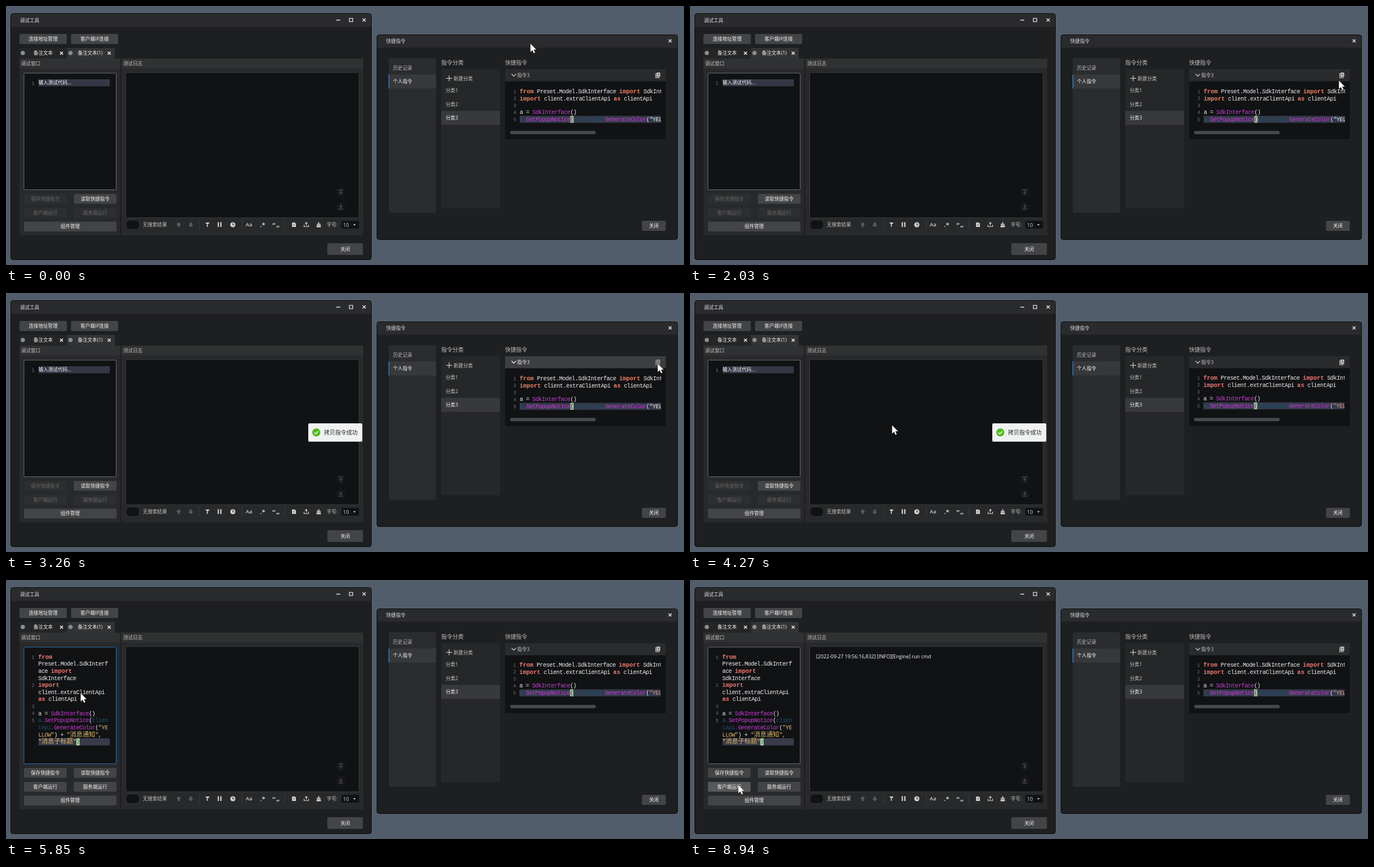
These frames come from a looping animation (1209x463 px, 10000 ms). An HTML page:

```html
<!DOCTYPE html>
<html lang="zh-CN">
<head>
<meta charset="utf-8">
<title>调试工具</title>
<style>
html, body { margin: 0; width: 100%; height: 100%; overflow: hidden; background: #515d6a; }
svg { display: block; width: 100%; height: 100%; }
text { font-family: "Open Sans", "Noto Sans CJK SC", "Noto Sans CJK", sans-serif; white-space: pre; }
.code { font-family: "Liberation Mono", "Noto Sans CJK SC", monospace; font-size: 10.3px; letter-spacing: -.54px; fill: #f0f0f0; }
.num { font-size: 8.6px; letter-spacing: 0; fill: #687089; text-anchor: end; }
.k { fill: #ee8560; font-weight: bold; letter-spacing: .11px; }
.f { fill: #cb3bd8; }
.v { fill: #245068; }
.s { fill: #dcb866; }
.c { fill: #dcb866; font-size: 11.28px; letter-spacing: 0; }
.q { fill: #f0f0f0; }
.b { fill: #26402c; }
.late .k, #pasted .k { fill: #f07a74; }
.late .q { fill: #e39a72; }
.late .num { fill: #6c6c6c; }
.late .v, #pasted .v { fill: #17546c; }
</style>
</head>
<body>
<svg id="stage" viewBox="0 0 1209 463"></svg>
<script>
const rect = (x, y, w, h, fill, more = '') =>
  `<rect x="${x}" y="${y}" width="${w}" height="${h}" fill="${fill}" ${more}/>`;
const text = (x, middle, str, fill = '#dedede', size = 8.6, more = '') =>
  `<text x="${x}" y="${middle + size * .37}" fill="${fill}" font-size="${size}" ${more}>${str}</text>`;
const line = (d, color = '#d0d0d0', width = 1.2) =>
  `<path d="${d}" fill="none" stroke="${color}" stroke-width="${width}"/>`;
const shape = (d, fill = '#c4c4c4') => `<path d="${d}" fill="${fill}"/>`;
const group = (id, body, more = '') => `<g id="${id}" ${more}>${body}</g>`;
const cross = (x, y, r, width = 1.4) =>
  line(`M${x - r} ${y - r}l${2 * r} ${2 * r}m0 ${-2 * r}l${-2 * r} ${2 * r}`, '#e6e6e6', width);
const button = (x, y, w, h, label, on = true, fill = on ? '#434446' : '#2d2e2f') =>
  rect(x, y, w, h, fill, 'rx="2"') +
  text(x + w / 2, y + h / 2, label, on ? '#f6f6f6' : '#666768', 8.6, 'text-anchor="middle"');
// {k word} wraps a word in a syntax colour class
const code = (x, middle, str) => `<text class="code" x="${x}" y="${middle + 3.2}">` +
  str.replace(/\{(\w) ([^}]*)\}/g, '<tspan class="$1">$2</tspan>') + '</text>';
const number = (x, middle, n) => `<text class="code num" x="${x}" y="${middle + 3}">${n}</text>`;

const frame = (x, y, w, h, bar) =>
  rect(x, y, w, h, '#1e1f21', 'rx="4" stroke="#08090a"') +
  rect(x + .5, y + .5, w - 1, bar, '#2a2b2d', 'rx="3.5"') + rect(x + .5, y + 5, w - 1, bar - 4, '#2a2b2d');

function toolbar() {
  const grey = '#5b5c5d', light = '#cfcfcf';
  const arrow = (x, dir) => shape(`M${x} ${391 - 4.5 * dir}l4.5 ${4.5 * dir}h-2.7v${4 * dir}h-3.6v${-4 * dir}h-2.7z`, grey);
  return rect(214, 382.5, 24, 17, '#111214', 'rx="7" stroke="#343536"') +
    text(244, 391, '无搜索结果', '#c4c4c4') + arrow(308, 1) + arrow(329.5, -1) +
    [345, 421, 497].map(x => rect(x - .5, 381, 1, 19, '#3b3c3d')).join('') +
    shape('M355 387h8l-3 4v4l-2-1v-3z', light) + line('M355 387l7 7', '#28292a', .8) +
    rect(377.5, 386.5, 2.3, 8.5, light) + rect(382, 386.5, 2.3, 8.5, light) +
    `<circle cx="404.5" cy="391" r="4.6" fill="${light}"/>` + line('M404.5 388v3.3h2.6', '#28292a', 1.1) +
    text(427.5, 391, 'Aa', light, 9.4, 'font-weight="600"') +
    text(453, 391, '.*', light, 11, 'font-weight="700"') +
    text(475, 392.5, '“', light, 12, 'font-weight="700"') + text(482, 390, '„', light, 12, 'font-weight="700"') +
    shape('M510 387h5l2 2v6h-7z', light) + line('M512 390h3m-3 2h3', '#555', .7) +
    line('M531.5 391v3.5h8v-3.5M535.5 393v-5', light) + shape('M532.7 389l2.8-3 2.8 3z', light) +
    shape('M556.7 386.5h1.8v3h2.6v2h-7v-2h2.6zM554 392.2h7.2l.5 3.3h-8.2z', light) +
    text(572, 391, '字号:', '#c8c8c8') + rect(598, 384, 31.5, 14, '#111214', 'rx="2"') +
    text(601, 391.3, '10', '#d8d8d8', 9) + shape('M619 390h4.6l-2.3 2.8z');
}

function runButtons(on) {
  return button(32, 336, 76, 17.5, '保存快捷指令', on) +
    button(32, 361, 76, 17.5, '客户端运行', on) + button(121, 361, 76, 17.5, '服务端运行', on);
}

function debugWindow() {
  const jump = (y, dir) => `<circle cx="597" cy="${y}" r="9" fill="#161718"/>` +
    line(`M593 ${y - 4 * dir}h8M597 ${y + 4.5 * dir}v${-6 * dir}m-3 ${3 * dir}l3 ${-3 * dir}l3 ${3 * dir}`, '#646566', 1);
  const tab = (x, label, fill) => rect(x, 75, 85, 19, fill) +
    `<circle cx="${x + 6}" cy="84" r="3.8" fill="#8c8d8e"/>` +
    text(x + (x > 50 ? 19 : 25), 84.3, label, '#f2f2f2') + cross(x + 75, 84.3, 2.6, 1.5);
  const source = [
    '{k from}', 'Preset.Model.SdkInterf', 'ace {k import}', 'SdkInterface', '{k import}', 'client.extraClientApi',
    '{k as} clientApi', '', 'a = {f SdkInterface}()', '{v a.}{f SetPopupNotice}({v clien}',
    '{v tApi.}{f GenerateColor}({s "YE}', '{s LLOW"}) + {s "}{c 消息通知}{s ",}', '{s "}{c 消息子标题}{s "}{b )}'
  ];
  const row = i => 137.6 + 12.61 * i;
  const pasted = rect(58, 283, 127, 12.7, '#393b4b') + rect(125.5, 283, 5.6, 12.7, '#b4e2ac') +
    [0, 4, 7, 8, 9].map((r, i) => number(51, row(r), i + 1)).join('') +
    source.map((s, i) => code(57.5, row(i), s)).join('');
  return frame(8.5, 13.5, 643, 440, 23) + text(25, 25.5, '调试工具') +
    line('M589 25.3h7', '#e0e0e0', 1.5) + line('M612.3 22.2h6v5.6h-6z', '#e0e0e0', 1.3) + cross(638.7, 25, 2.8) +
    button(24, 50, 84.5, 18, '连接地址管理') + button(116, 50, 84, 18, '客户端IP连接') +
    tab(24, '备注文本', '#242526') + tab(109, '备注文本(1)', '#323334') +
    rect(24, 94, 613, 316, '#28292a') + rect(24, 94, 613, 17.5, '#303132') + rect(203.5, 94, 2, 316, '#1e1f21') +
    text(27, 102.8, '调试窗口', '#c0c0c0') + text(209, 102.8, '测试日志', '#c0c0c0') +
    rect(32, 120, 164.5, 208.5, '#111214', 'id="editor" rx="1.5" stroke="#6d6e6f"') +
    group('empty', rect(58, 131, 127, 12.5, '#343846') + number(51, 137.5, 1) +
      text(58, 137.3, '输入测试代码...', '#fafafa', 8.6, 'font-weight="500"')) +
    group('pasted', pasted) + rect(0, 0, 1, 12, '#e8e8e8', 'id="caret"') +
    group('disabled', runButtons(false)) + group('enabled', runButtons(true)) +
    group('pressed', button(32, 361, 76, 17.5, '客户端运行', true, '#57585a')) +
    button(121, 336, 76, 17.5, '读取快捷指令') + button(32, 385.5, 165, 17.5, '组件管理') +
    rect(213.5, 119, 416, 259.5, '#111214', 'rx="2" stroke="#37383a"') + jump(333, 1) + jump(359, -1) + toolbar() +
    group('log', text(225, 136.6, '[2022-09-27 19:56:16,832] [INFO][Engine] run cmd', '#fff', 8.8, 'font-weight="500"')) +
    button(573, 424, 63.5, 21, '关闭');
}

function commandWindow() {
  const row = i => 153 + 12.4 * i;
  const source = ['{k from} Preset.Model.SdkInterface {k import} SdkInterface', '{k import} client.extraClientApi {k as} clientApi',
    '', 'a = {f SdkInterface}()', '{v a.}{f SetPopupNotice}{b (}{v clientApi.}{f GenerateColor}({q "YELLOW")}'];
  const listing = rect(916, 196.3, 252, 12.6, '#34394a') + rect(1006.5, 196.3, 5.7, 12.6, '#a9c3a0') +
    source.map((s, i) => number(910, row(i), i + 1) + code(916, row(i), s)).join('');
  const head = (fill, color, icon) => rect(890, 113, 286.5, 21.5, fill) +
    line('M901.5 121.5l4 4 4-4', color, 1.3) + text(911.5, 124, '指令3', color) +
    line('M1158.6 120v8.2h7', icon, 1.2) + rect(1160, 119, 6.5, 7.5, icon, 'rx=".8"') +
    line('M1161.8 121.5h3m-3 2h3', fill, .9);
  return frame(661.5, 51.5, 536, 366, 22) + text(678, 63.2, '快捷指令') + cross(1184.2, 62.3, 2.6) +
    rect(682.5, 93.5, 84.5, 276, '#2b2c2e', 'rx="2"') + rect(682.5, 122.5, 84.5, 25, '#37383a') +
    rect(682, 122.5, 1.5, 25, '#3579b5') + text(690, 110.7, '历史记录', '#bdbdbd') + text(690, 135, '个人指令', '#fafafa') +
    text(776, 101, '指令分类', '#c0c0c0', 10) + text(890, 101, '快捷指令', '#c0c0c0', 9.8) +
    rect(776, 112.5, 105, 249, '#262728', 'rx="2"') + rect(776, 187.5, 105, 25, '#38393b') +
    line('M785 129.3h10.5m-5.25-5.25v10.5', '#d0d0d0', 1.2) + text(798, 129.5, '新建分类', '#c8c8c8') +
    [1, 2, 3].map(n => text(784, 126.2 + 24.7 * n, '分类' + n, n > 2 ? '#f6f6f6' : '#c8c8c8')).join('') +
    rect(890, 134, 286.5, 104, '#111214') + group('head', head('#2a2b2d', '#c6c6c6', '#c9c9c9')) +
    group('headHover', head('#3d3e40', '#f0f0f0', '#929394')) +
    `<clipPath id="clip"><rect x="890" y="135" width="278" height="100"/></clipPath>` +
    group('listing', listing, 'clip-path="url(#clip)"') + rect(899, 223.3, 152.5, 6, '#48494a', 'rx="2.5"') +
    button(1134, 384, 42.5, 18, '关闭');
}

const toast = rect(539, 233, 96.3, 32.7, '#f0f2f2', 'rx="2"') +
  '<circle cx="553.3" cy="249.3" r="7.2" fill="#52bd1c"/>' + line('M549.8 249.5l2.6 2.5 4.4-4.7', '#fff', 1.5) +
  text(567, 249.6, '拷贝指令成功', '#26282a', 10);
const pointer = '<path d="M0 0V15.6L3.6 12.2 6 17.6 8.7 16.4 6.3 11.2H11Z" fill="#fff" stroke="#222" stroke-width=".5"/>';

const stage = document.getElementById('stage');
stage.innerHTML = rect(0, 0, 1209, 463, '#515d6a') + debugWindow() + commandWindow() +
  group('toast', toast) + group('pointer', pointer);
const el = id => document.getElementById(id);
const show = (id, on) => el(id).setAttribute('visibility', on ? 'visible' : 'hidden');

// time, x, y, eased arrival
const path = [
  [0, 935, 67], [1000, 935, 67], [2030, 1157, 133, true], [2570, 1162, 126], [3930, 1162, 126],
  [4270, 362, 236], [4340, 235, 246], [4410, 156, 240], [4540, 156, 240], [4800, 144, 211], [5100, 144, 211],
  [5240, 136, 206], [5380, 136, 206], [5650, 133, 202], [6640, 133, 202], [6920, 110, 274],
  [7300, 85, 350], [7550, 86, 366], [10000, 86, 366]
];
function pointerAt(t) {
  const i = path.findIndex(p => p[0] > t);
  const [t0, x0, y0] = path[i - 1], [t1, x1, y1, eased] = path[i];
  let p = (t - t0) / (t1 - t0);
  if (eased) p = p * p * (3 - 2 * p);
  return [x0 + (x1 - x0) * p, y0 + (y1 - y0) * p];
}
const clamp = v => Math.max(0, Math.min(1, v));
const within = (t, a, b) => t >= a && t < b;

function draw(now) {
  const t = now % 10000;
  const pasted = t >= 5850, moved = t >= 3990, focused = within(t, 4820, 7750);
  const hover = within(t, 2100, 3990), pressed = t >= 7750;
  el('pointer').setAttribute('transform', `translate(${pointerAt(t)})`);
  el('toast').setAttribute('opacity', clamp((t - 2700) / 560) * clamp((5240 - t) / 500));
  show('headHover', hover);
  show('head', !hover);
  el('listing').setAttribute('class', moved ? 'late' : '');
  el('listing').setAttribute('transform', moved ? 'translate(-.6 -.9)' : '');
  el('editor').setAttribute('stroke', focused ? '#2873b8' : '#6d6e6f');
  show('empty', !pasted);
  show('pasted', pasted);
  show('disabled', !pasted);
  show('enabled', pasted);
  show('pressed', pressed);
  show('log', t >= 8940);
  show('caret', within(t, 4820, 5380) || within(t, 5920, 6450) || within(t, 6980, 7510));
  el('caret').setAttribute('x', pasted ? 131 : 58);
  el('caret').setAttribute('y', pasted ? 283 : 131);
}
const start = performance.now();
function tick() {
  draw(performance.now() - start);
  requestAnimationFrame(tick);
}
tick();
</script>
</body>
</html>
```
